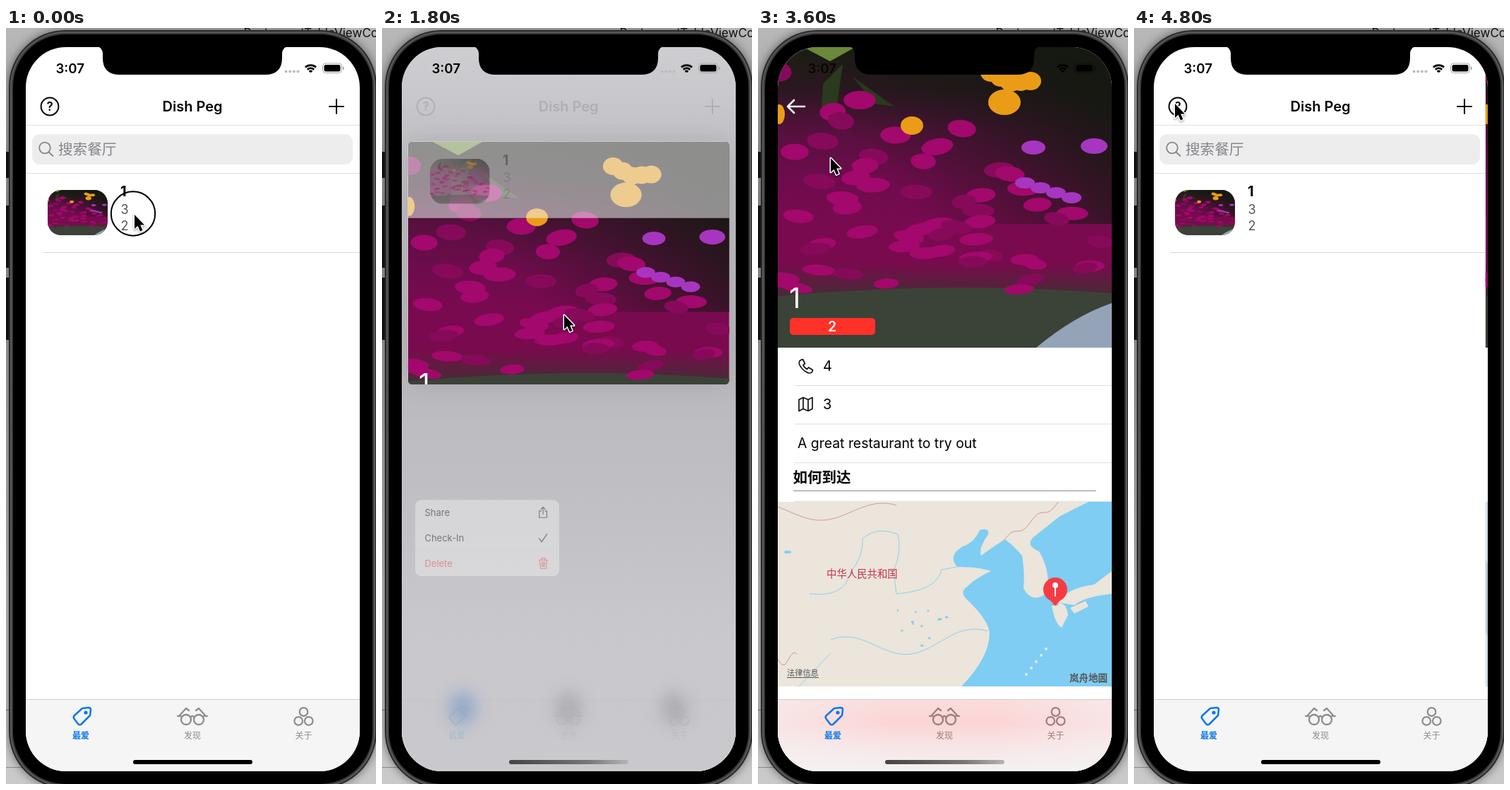
These frames come from a looping animation (524x1069 px, 5 s). An HTML page with a canvas:

```html
<!DOCTYPE html>
<html lang="zh-CN">
<head>
<meta charset="utf-8">
<title>Restaurant list</title>
<style>
html, body { margin: 0; width: 100%; height: 100%; overflow: hidden; background: #000; }
canvas { display: block; width: 524px; height: 1069px; }
</style>
</head>
<body>
<canvas id="stage"></canvas>
<script>
const W = 524, H = 1069, LOOP = 5000, STEP = 200;
const SX = 28, SY = 27, SW = 473, SH = 1024;
const canvas = document.getElementById('stage');
const ratio = window.devicePixelRatio || 1;
canvas.width = W * ratio;
canvas.height = H * ratio;
const c = canvas.getContext('2d');

const lerp = (a, b, k) => a + (b - a) * k;

function random(seed) {
  return () => (seed = (seed * 16807) % 2147483647) / 2147483647;
}

function repeat(n, draw) {
  for (let i = 0; i < n; i++) draw(i);
}

function layer(draw, { x = 0, y = 0, s = 1, sy = s, turn = 0, shear = 0, alpha = 1 } = {}) {
  c.save();
  c.translate(x, y);
  c.rotate(turn);
  c.transform(s, 0, shear, sy, 0, 0);
  c.globalAlpha *= alpha;
  draw();
  c.restore();
}

function box(x, y, w, h, color, r = 0) {
  c.fillStyle = color;
  c.beginPath();
  c.roundRect(x, y, w, h, r);
  c.fill();
}

function clipBox(x, y, w, h, r, draw) {
  c.save();
  c.beginPath();
  c.roundRect(x, y, w, h, r);
  c.clip();
  draw();
  c.restore();
}

function oval(x, y, rx, ry, color, turn = 0) {
  c.beginPath();
  c.ellipse(x, y, rx, ry, turn, 0, 7);
  c.fillStyle = color;
  c.fill();
}

function ring(x, y, r, color, width) {
  c.beginPath();
  c.arc(x, y, r, 0, 7);
  c.strokeStyle = color;
  c.lineWidth = width;
  c.stroke();
}

function shape(d, color, x = 0, y = 0) {
  layer(() => {
    c.fillStyle = color;
    c.fill(new Path2D(d));
  }, { x, y });
}

function icon(d, x, y, color, width = 1.7) {
  layer(() => {
    c.strokeStyle = color;
    c.lineWidth = width;
    c.lineJoin = c.lineCap = 'round';
    c.stroke(new Path2D(d));
  }, { x, y });
}

function plot(f, from, to, color) {
  c.beginPath();
  for (let x = from; x <= to; x += 3) c.lineTo(x, f(x));
  c.strokeStyle = color;
  c.lineWidth = 1;
  c.stroke();
}

// y is the middle of the capitals
function text(s, x, y, size, color = '#000', weight = 400, align = 'left') {
  c.font = `${weight} ${size}px Inter, "Noto Sans CJK SC", "Noto Sans CJK", sans-serif`;
  c.textAlign = align;
  c.fillStyle = color;
  c.fillText(s, x, y + size * 0.367);
}

function fade(x0, y0, x1, y1, ...colors) {
  const g = c.createLinearGradient(x0, y0, x1, y1);
  colors.forEach((col, i) => g.addColorStop(i / (colors.length - 1), col));
  return g;
}

// ---- flower picture, 473 x 425 ----
function picture() {
  const rnd = random(71);
  clipBox(0, 0, SW, 425, 0, () => {
    box(0, 0, SW, 425, fade(0, 0, 0, 425, '#1a1e13', '#2c1721', '#58103f', '#6d0c4c', '#780a50', '#7a0a4e', '#3a332d', '#474e45'));
    box(0, 0, SW, 250, fade(190, 230, 420, 40, 'rgba(20,24,16,0)', 'rgba(20,24,16,.9)'));
    shape('M0 352 Q240 330 473 348 V425 H0Z', '#3b4238');
    shape('M366 425 Q420 380 473 362 V425Z', '#95a3b8');
    shape('M36 0 H110 L74 20Z', '#6c8838');
    shape('M62 92 L64 52 L92 24 L84 82Z M106 42 L165 84 L138 80Z', '#2a3a1c');
    repeat(60, i => {
      const v = Math.sqrt(i / 60), y = lerp(35, 345, v);
      const x = rnd() * lerp(150, 580, v);
      oval(x, y, 17 + rnd() * 7, lerp(14, 7, v), i % 3 ? '#a3086c' : '#870a5a', rnd() * 0.4 - 0.2);
    });
    repeat(5, i => oval(302 + i * 14, 44 + Math.abs(2 - i) * -4 + i * 3, 15, 13, '#eb9c16'));
    oval(321, 78, 23, 18, '#eb9c16');
    oval(190, 111, 16, 13, '#eb9c16');
    oval(2, 95, 8, 14, '#eb9c16');
    oval(362, 142, 17, 10, '#a636c0');
    oval(448, 140, 19, 11, '#a636c0');
    repeat(4, i => oval(350 + i * 22, 192 + i * 7, 14, 8, '#a636c0'));
  });
}

// ---- maps, 473 x 261 ----
function regionMap() {
  const sea = '#7fcdf3', land = '#ebe5db', river = '#8ed0ee', border = '#d596a0';
  const rnd = random(8);
  box(0, 0, SW, 261, land);
  shape(`M260 261 Q300 220 300 185 Q298 168 272 142 Q255 128 268 120 Q280 108 302 98 Q285 92 254 92
    Q240 76 262 63 Q278 58 286 40 Q300 36 298 46 Q284 66 288 76 Q310 60 322 53 Q334 62 346 76
    Q350 100 348 122 Q360 146 382 128 Q386 96 370 70 Q350 62 362 50 L400 20 L440 0 H473 V261Z`, sea);
  shape('M388 146 Q408 136 411 160 L402 178 Q392 172 388 146Z', land);
  shape('M396 142 Q410 122 448 117 L473 98 V130 Q435 134 420 146Z M414 150 L436 140 L440 148 L420 158Z', land);
  repeat(5, i => oval(380 - i * 7, 208 + i * 9, 2, 2, land));
  plot(x => 14 + 12 * Math.sin(x / 28 - 0.6), 0, 168, border);
  plot(x => 55 - (x - 320) * 0.7 + 4 * Math.sin(x / 6), 320, 398, border);
  plot(x => 222 + 9 * Math.sin(x / 5), 0, 28, border);
  icon('M45 130 Q95 136 103 100 Q122 76 120 52 Q140 34 170 46 Q176 70 164 98 L168 130 Q225 126 232 96 L254 92', 0, 0, river, 1);
  plot(x => 202 + 15 * Math.sin(x / 29 + 1.5) - (x - 160) * 0.06, 75, 298, river);
  plot(x => 261 - (x - 30) * 1.05, 30, 75, river);
  repeat(12, () => oval(170 + rnd() * 90, 150 + rnd() * 60, 1 + rnd() * 2, 1.5, sea));
  oval(14, 71, 5, 2, sea);
  text('中华人民共和国', 69, 102, 14.4, '#c9304c', 500);
  mapMarks(393, 124);
}

function streetMap() {
  const rnd = random(19);
  box(0, 0, SW, 261, '#f6f1ea');
  repeat(7, row => repeat(6, col => {
    const x = 215 + col * 46 + row * 16, y = 14 + row * 40 - col * 8;
    layer(() => box(-9, -7, 14 + rnd() * 14, 10 + rnd() * 10, '#e7e4e1'), { x, y, turn: -0.55 });
  }));
  const roads = 'M190 22 L245 2 M208 30 L270 118 Q312 110 306 84 L298 62 L345 2 M306 72 Q340 35 400 10 M304 106 L345 157 L390 185 L355 205 L400 261 M390 185 L473 118 M368 150 L473 60';
  icon(roads, 0, 0, '#e4e0dc', 9);
  icon(roads, 0, 0, '#fff', 7);
  icon('M343 156 Q400 105 473 66 M380 261 L473 194', 0, 0, '#8ed0ee', 1.8);
  shape('M235 88 L245 71 L270 68 L264 86 L268 112 L258 120Z', '#b9a78f');

  // everything by the water runs along the slanted shore
  layer(() => {
    box(-160, 0, 332, 261, '#d3dfea');
    box(-106, 0, 59, 261, '#b9ccd7');
    box(75, 0, 18, 261, '#f6f3f2');
    box(164, 0, 29, 261, '#e3e5e6');
    box(177, 0, 12, 261, '#cbcfd1');
    repeat(6, i => box(113, 30 + i * 15, 9, 8, '#e1e4e5'));
    box(106, 142, 30, 22, '#e4e5e5');
    box(112, 172, 25, 46, '#e4e5e5');
  }, { shear: 0.575 });
  mapMarks(236, 108);
}

function mapMarks(px, py) {
  oval(px, py + 21, 5, 2, 'rgba(0,0,0,.2)');
  shape('M-9 13 H9 L0 23Z', '#f73b43', px, py);
  oval(px, py, 17, 17, '#f73b43');
  icon('M0 -4 V9', px, py, '#fff', 2);
  oval(px, py - 6, 4, 4, '#fff');
  text('法律信息', 13, 242, 11.2, '#555');
  box(13, 248, 45, 1, '#555');
  text('岚舟地圖', 413, 249, 13.5, '#555', 700);
}

// ---- detail page, origin at the screen corner ----
function detail(zoomed) {
  box(0, 0, SW, SH, '#fff');
  picture();
  text('1', 16, 354, 40, '#fff');
  box(17, 383, 121, 24, '#ff3229', 5);
  text('2', 77, 395, 19.5, '#fff', 600, 'center');
  icon('M3 1 L6 0 L9 6 L6.5 8 Q8 12 12 14 L14 11.5 L20 15 L19 18 Q16 21 11 18 Q4 14 1 7 Q0 3 3 1Z', 29.5, 441.5, '#111');
  text('4', 64, 451, 20);
  icon('M0 3 L6 0 L13 3 L19 0 V16 L13 19 L6 16 L0 19Z M6 0 V16 M13 3 V19', 30, 495.5, '#111');
  text('3', 64, 505, 20);
  text('A great restaurant to try out', 28, 560, 19.4);
  repeat(4, i => box(24, 478 + i * 54.6, SW - 24, 1, '#dedee0'));
  text('如何到达', 21.5, 608, 20.5, '#000', 700);
  box(22, 627, 429, 1, '#87878a');
  clipBox(0, 643, SW, 261, 0, () => layer(zoomed ? streetMap : regionMap, { y: 643 }));
}

// ---- list page ----
function row(dx, dy) {
  layer(() => {
    clipBox(59, 229, 85, 64, 19, () => layer(picture, { x: 59, y: 229, s: 85 / SW, sy: 64 / 425 }));
    text('1', 162, 231, 20, '#000', 700);
    text('3', 162.5, 256, 18, '#555');
    text('2', 162.5, 279, 18, '#555');
  }, { x: dx, y: dy });
}

function list(dx, navAlpha) {
  box(SX, SY, SW, SH, '#fff');
  layer(() => {
    box(SX, 137, SW, 1, '#dfdfe0');
    box(37, 150, 454, 43, '#ededee', 11);
    ring(55, 169.5, 7.8, '#85858a', 1.8);
    icon('M61 176 L66.5 181', 0, 0, '#85858a', 1.8);
    text('搜索餐厅', 74, 171.5, 20.6, '#85858a');
    box(SX, 205, SW, 1, '#dfdfe0');
    box(52, 317, 449, 1, '#dadadc');
  }, { x: dx });
  row(dx, 0);
  layer(() => {
    ring(62, 111, 12.4, '#000', 2);
    text('?', 62, 111, 17, '#000', 600, 'center');
    text('Dish Peg', 264, 111, 20, '#000', 600, 'center');
    icon('M-10 0 H10 M0 -10 V10', 468, 111, '#000', 2);
  }, { alpha: navAlpha });
}

function tabBar(tint) {
  box(SX, 949, SW, 102, '#f5f5f5');
  layer(() => {
    box(SX, 949, SW, 102, fade(0, 949, 0, 1051, '#fbdcdc', '#fcd5d6', '#f7e6e6', '#f3f2f2'));
    box(SX, 949, SW, 102, fade(SX, 0, SX + SW, 0, 'rgba(245,243,243,.5)', 'rgba(245,243,243,0)', 'rgba(245,243,243,0)', 'rgba(245,243,243,.5)'));
  }, { alpha: tint });
  box(SX, 949, SW, 1, '#cfcfd1');
  const gray = tint > 0.5 ? '#a07c7d' : '#8c8c8c', blue = '#0b78ec';
  icon('M13 2 L22 1 Q25 1 25 4 L24 12 L11 25 Q9 26 7 24 L1 16 Q0 14 2 12Z', 95, 960, blue, 2.5);
  oval(113, 968, 2.6, 2.6, blue);
  ring(255, 978, 7, gray, 2.3);
  ring(273, 978, 7, gray, 2.3);
  icon('M0 12 H5 M37 12 H42 M2 12 L12 1 L16 4 M40 12 L30 1 L26 4 M19 13 Q21 11 23 13', 243, 961, gray, 2.2);
  repeat(3, i => {
    const a = -Math.PI / 2 + i * Math.PI * 2 / 3;
    ring(421.5 + 8.4 * Math.cos(a), 975.6 + 8.6 * Math.sin(a), 5.8, gray, 2.2);
  });
  text('最爱', 106, 1000.5, 12, blue, 700, 'center');
  text('发现', 264, 1000.5, 12, gray, 500, 'center');
  text('关于', 421.5, 1000.5, 12, gray, 500, 'center');
}

function statusBar(dark) {
  text('3:07', 70.5, 57, 18.6, dark ? 'rgba(0,0,0,.75)' : '#000', 600);
  if (!dark) repeat(4, i => oval(396.5 + i * 5.7, 61.5, 2, 2, '#bcbcbf'));
  c.strokeStyle = '#000';
  c.lineCap = 'butt';
  c.lineWidth = 2.8;
  repeat(3, i => {
    c.beginPath();
    c.arc(431.5, 64, 2.8 + i * 4.3, -2.3, -0.84);
    c.stroke();
  });
  const edge = dark ? 'rgba(0,0,0,.4)' : '#a5a5a8';
  c.strokeStyle = edge;
  c.lineWidth = 1;
  c.beginPath();
  c.roundRect(448.5, 50, 27, 13.5, 4);
  c.stroke();
  box(450.5, 52, 23, 9.5, '#000', 2.5);
  box(477, 54.5, 1.6, 5, edge, 1);
}

// ---- context menu ----
function backdrop(alpha) {
  layer(() => {
    box(SX, SY, SW, SH, fade(0, SY, 0, 1051, '#c9c9cd', '#b7b6bb', '#b2b1b6', '#b9b8bd', '#c3c2c7', '#c5c4c9'));
    c.filter = 'blur(11px)';
    repeat(3, i => oval(114 + i * 150, 962, 19, 24, i ? '#acabb0' : '#8fa6c9'));
    c.filter = 'none';
  }, { alpha });
}

function preview(e) {
  const x = lerp(SX, 47, e), y = lerp(205, 108, e), w = lerp(SW, 434, e), h = lerp(112, 620, e), r = 14 * e;
  c.save();
  c.shadowColor = `rgba(0,0,0,${0.22 * e})`;
  c.shadowBlur = 45 * ratio;
  box(x, y, w, h, '#fff', r);
  c.restore();
  clipBox(x, y, w, h, r, () => {
    layer(() => detail(false), { x, y, s: w / SW });
    layer(() => box(x, y, w, 108, '#f3f2f5'), { alpha: 1 - e });
    layer(() => row(x - SX, y - 205), { alpha: (1 - e) ** 2 });
  });
}

function menu(e) {
  layer(() => {
    const red = '#e0393a';
    box(0, 0, 303, 160, '#ededee', 13);
    box(0, 53, 303, 1, '#cfcfd2');
    box(0, 106, 303, 1, '#cfcfd2');
    text('Share', 20, 27, 19.3);
    text('Check-In', 20, 80, 19.3);
    text('Delete', 20, 133.5, 19.3, red);
    icon('M5 8 H1 V22 H17 V8 H13 M9 15 V0 M4.5 4.5 L9 0 L13.5 4.5', 260, 15, '#111');
    icon('M0 9 L5 16 L16 0', 261, 72, '#111', 2);
    icon('M0 4 H19 M6 4 V0 H13 V4 M2 4 L3.5 22 H15.5 L17 4 M6.5 8 L7 18 M9.5 8 V18 M12.5 8 L12 18', 260, 122, red, 1.6);
  }, { x: 47, y: lerp(600, 748, e), s: lerp(0.4, 1, e), alpha: e });
}

// ---- device and pointer ----
function desk() {
  box(0, 0, W, H, fade(0, 0, 0, H, '#b8b8b8', '#989898', '#b0b0b0', '#c6c6c6', '#cacaca'));
  text('RestaurantTableViewCo', 527, 7, 17, '#111', 400, 'right');
  box(0, 964, 6, 1, '#777');
  box(0, 1045, 30, 1, '#8a8a8a');
  box(-3, 175, 10, 37, '#161616', 2);
  box(-3, 251, 10, 88, '#161616', 2);
  box(-3, 353, 10, 88, '#161616', 2);
  c.save();
  c.shadowColor = 'rgba(0,0,0,.5)';
  c.shadowBlur = 14 * ratio;
  ['#2a2a2a', '#5a5a5c', '#3a3a3c', '#000'].forEach((color, i) => {
    const d = i * 2;
    box(4 + d, 3 + d, 521 - 2 * d, 1072 - 2 * d, color, 80 - d);
    c.shadowColor = 'transparent';
  });
  c.restore();
}

function homeBar(solid) {
  box(180, 1035, 169, 6, solid ? '#000' : fade(180, 0, 349, 0, '#444', '#5c5c5c', '#777', '#b5b5b5'), 3);
}

// time, x, y
const path = [[0, 181, 262], [800, 181, 262], [1200, 223, 381], [1600, 257, 404], [2000, 257, 404], [2600, 123, 190],
  [2800, 135, 185], [3200, 135, 185], [3600, 102, 182], [4000, 95, 170], [4400, 57, 105], [LOOP, 57, 105]];

function pointer(t) {
  const i = path.findIndex(k => k[0] > t), [t0, x0, y0] = path[i - 1], [t1, x1, y1] = path[i];
  const k = (t - t0) / (t1 - t0), arrow = 'M0 0 V20 L4.6 15.7 L8 23.5 L11.4 22 L8.2 14.5 H14Z';
  const x = lerp(x0, x1, k) + 1, y = lerp(y0, y1, k) + 2;
  c.save();
  c.shadowColor = 'rgba(0,0,0,.35)';
  c.shadowBlur = 3 * ratio;
  c.shadowOffsetY = 1.5 * ratio;
  icon(arrow, x, y, '#fff', 3);
  c.restore();
  shape(arrow, '#000', x, y);
}

// critically damped spring: what is left of a move begun at start
function rest(t, start) {
  const k = Math.max(0, t - start) * 0.01826;
  const r = Math.exp(-k) * (1 + k);
  return r < 0.002 ? 0 : r;
}

const stay = (t, open, close) => (1 - rest(t, open)) * rest(t, close);

function screen(t) {
  const page = stay(t, 3100, 4413), peek = stay(t, 700, 1700);
  list(-0.3 * SW * page, 1 - page);
  if (page > 0) {
    box(SX, SY, SW, SH, `rgba(0,0,0,${0.1 * page})`);
    layer(() => detail(t >= 3800), { x: SX + SW * (1 - page), y: SY });
    layer(() => icon('M24 9 H0 M9 0 L0 9 L9 18', 42, 102, '#fff', 2.6), { alpha: page });
  }
  tabBar(page);
  if (peek > 0) {
    backdrop(Math.min(1, 2 * peek));
    preview(peek);
    menu(peek);
  }
  statusBar(page > 0.5);
  homeBar(peek > 0.5 || (t + STEP) % LOOP <= STEP);
}

function draw(t) {
  c.setTransform(ratio, 0, 0, ratio, 0, 0);
  desk();
  clipBox(SX, SY, SW, SH, 57, () => screen(t));
  shape('M128 26 Q137 27 137 37 V42 Q137 66 161 66 H367 Q391 66 391 42 V37 Q391 27 400 26Z', '#000');
  if (t < 800) ring(180, 262.5, 31.2, '#000', 2);
  pointer(t);
}

const begin = performance.now();
let last = -1;
function tick() {
  const t = Math.floor(((performance.now() - begin) % LOOP) / STEP) * STEP;
  if (t !== last) draw(last = t);
  requestAnimationFrame(tick);
}
tick();
</script>
</body>
</html>
```
